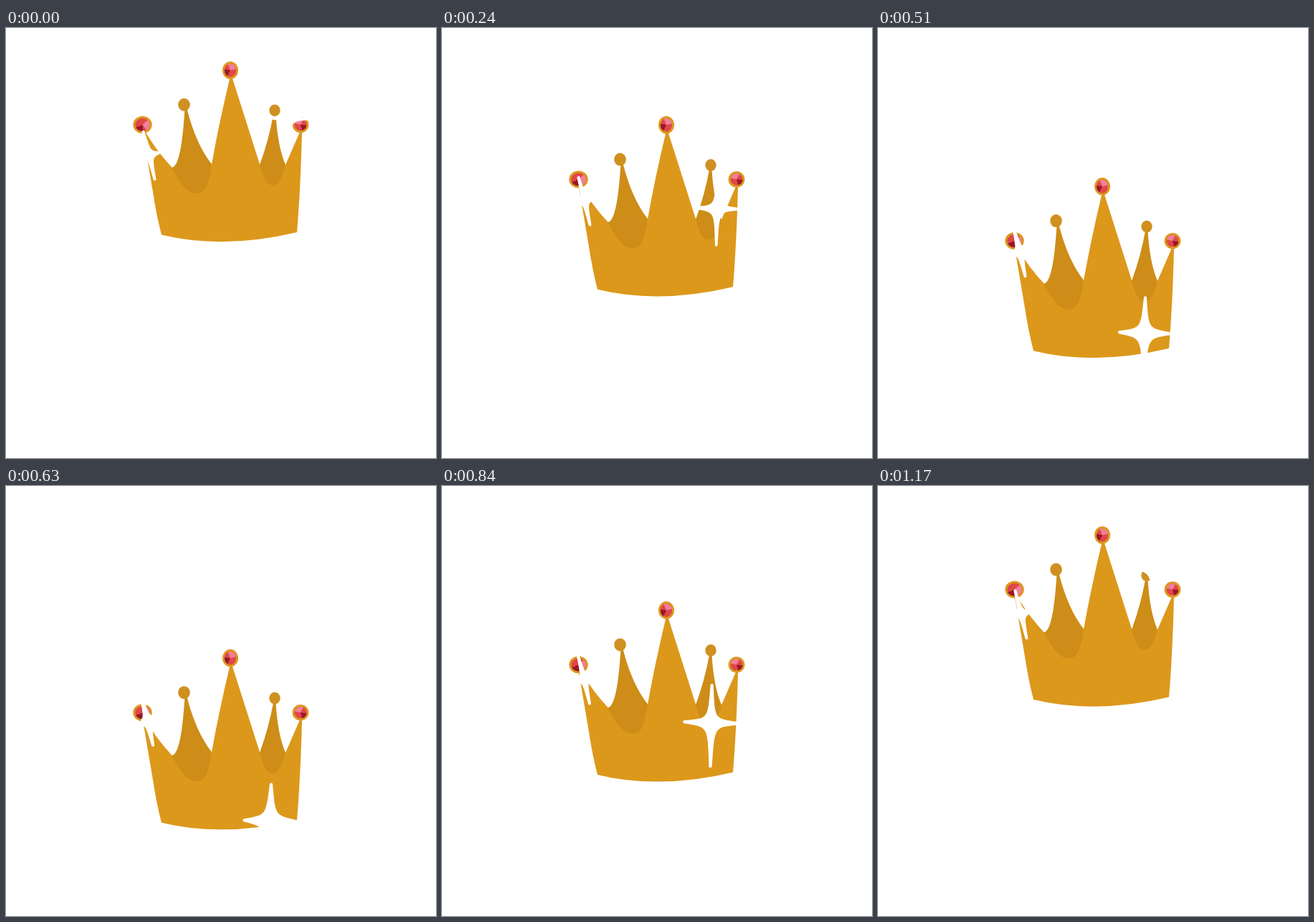
Recreate the animation shown at these times as an HTML page with a canvas. Size 600 by 600 pixels, loop 1.2 s.

```html
<!DOCTYPE html>
<html lang="en">
<head>
<meta charset="utf-8">
<title>Crown</title>
<style>
html, body { margin: 0; width: 100%; height: 100%; overflow: hidden; background: #fff; }
canvas { display: block; width: 600px; height: 600px; }
</style>
</head>
<body>
<canvas id="stage" width="600" height="600"></canvas>
<script>
const ctx = document.getElementById('stage').getContext('2d');
const LOOP = 1200, STEP = 30, TRAVEL = 190.7;
const GOLD = '#dc981b', SHADE = '#cd8d18', BALL = '#d09020';
const RED = '#e0464a', PINK = '#f0809a', DARK = '#96182a';

const body = new Path2D(`M191 146 L195 146 Q212 174 232 195 L287 190
  Q297 134 312.5 69 L315.5 69 L354 190 L390 191 L410 145
  L413 145 Q411 225 406 285 Q303 309.5 217 288.5 Q210 262 205 229 Z`);
const leftBack = new Path2D(`M249.5 113 L252.5 113 Q265 162 287 190
  C282 222 278 231 265 231 C250 230 242 212 231 195 C243 194 247 150 249.5 113 Z`);
const rightBack = new Path2D(`M373 121 L376.5 121 Q379 165 390 191
  C384 210 381 219 372 219.5 C362 219 359 207 354 191 Q367 155 373 121 Z`);

function fill(path, color) {
  ctx.fillStyle = color;
  ctx.fill(path);
}

function oval(x, y, rx, ry, color, from = 0, to = Math.PI * 2) {
  ctx.beginPath();
  if (to - from < 6) ctx.moveTo(x, y);
  ctx.ellipse(x, y, rx, ry, 0, from, to);
  ctx.fillStyle = color;
  ctx.fill();
}

function gem(x, y, rx, ry, darkAngle, pinkAngle) {
  oval(x, y, rx, ry, GOLD);
  const ix = rx - 3, iy = ry - 3;
  oval(x, y, ix, iy, RED);
  oval(x, y, ix, iy, PINK, pinkAngle - .9, pinkAngle + .9);
  oval(x, y, ix, iy, DARK, darkAngle - .6, darkAngle + .6);
}

function crown(y) {
  ctx.save();
  ctx.translate(0, y);
  fill(body, GOLD);
  fill(leftBack, SHADE);
  fill(rightBack, SHADE);
  oval(248.5, 107, 8.3, 9, BALL);
  oval(375, 115, 7.7, 8.3, BALL);
  gem(190.5, 135, 13.2, 12, 2.1, .1);
  gem(313, 59, 11, 12.3, 2.7, -1.1);
  gem(411, 135, 11.4, 11.2, .7, -2);
  ctx.restore();
}

// Four-pointed star; tips run up, right, down, left
function star(x, y, scale, waist, tips) {
  ctx.save();
  ctx.translate(x, y);
  ctx.scale(scale, scale);
  ctx.beginPath();
  ctx.moveTo(...tips[0]);
  tips.forEach((a, i) => {
    const b = tips[(i + 1) % 4];
    const inner = [(a[0] + b[0]) * waist, (a[1] + b[1]) * waist];
    ctx.bezierCurveTo(...inner, ...inner, ...b);
  });
  ctx.closePath();
  ctx.fillStyle = ctx.strokeStyle = '#fff';
  ctx.lineWidth = 4;
  ctx.lineJoin = 'round';
  ctx.fill();
  ctx.stroke();
  ctx.restore();
}

const mix = (a, b, p) => a + (b - a) * p;

function draw() {
  const t = Math.floor(performance.now() % LOOP / STEP) * STEP;
  const p = 1 - Math.abs(t / (LOOP / 2) - 1);
  const falling = t < LOOP / 2;
  const plump = .08 * p ** 4;

  ctx.fillStyle = '#fff';
  ctx.fillRect(0, 0, 600, 600);
  crown(TRAVEL * p);

  // The large star starts its fall lower and smaller than it ends its rise
  const bigTips = [[1, -49], [35, 1], [-1, 57], [-35, -1]];
  if (falling) star(mix(394, 368, p), mix(126, 487, p ** 1.15), mix(.8, 1.04, p), .06 + plump, bigTips);
  else star(mix(387, 368, p), mix(95, 487, p), mix(1.1, 1.04, p), .06 + plump, bigTips);

  const smallTips = [[-8, -32], [14, -3], [8, 34], [-9, 3]];
  star(mix(199.5, 197, p), mix(falling ? 177 : 170, 336, p), 1, .11 + plump, smallTips);
  requestAnimationFrame(draw);
}
draw();
</script>
</body>
</html>
```
